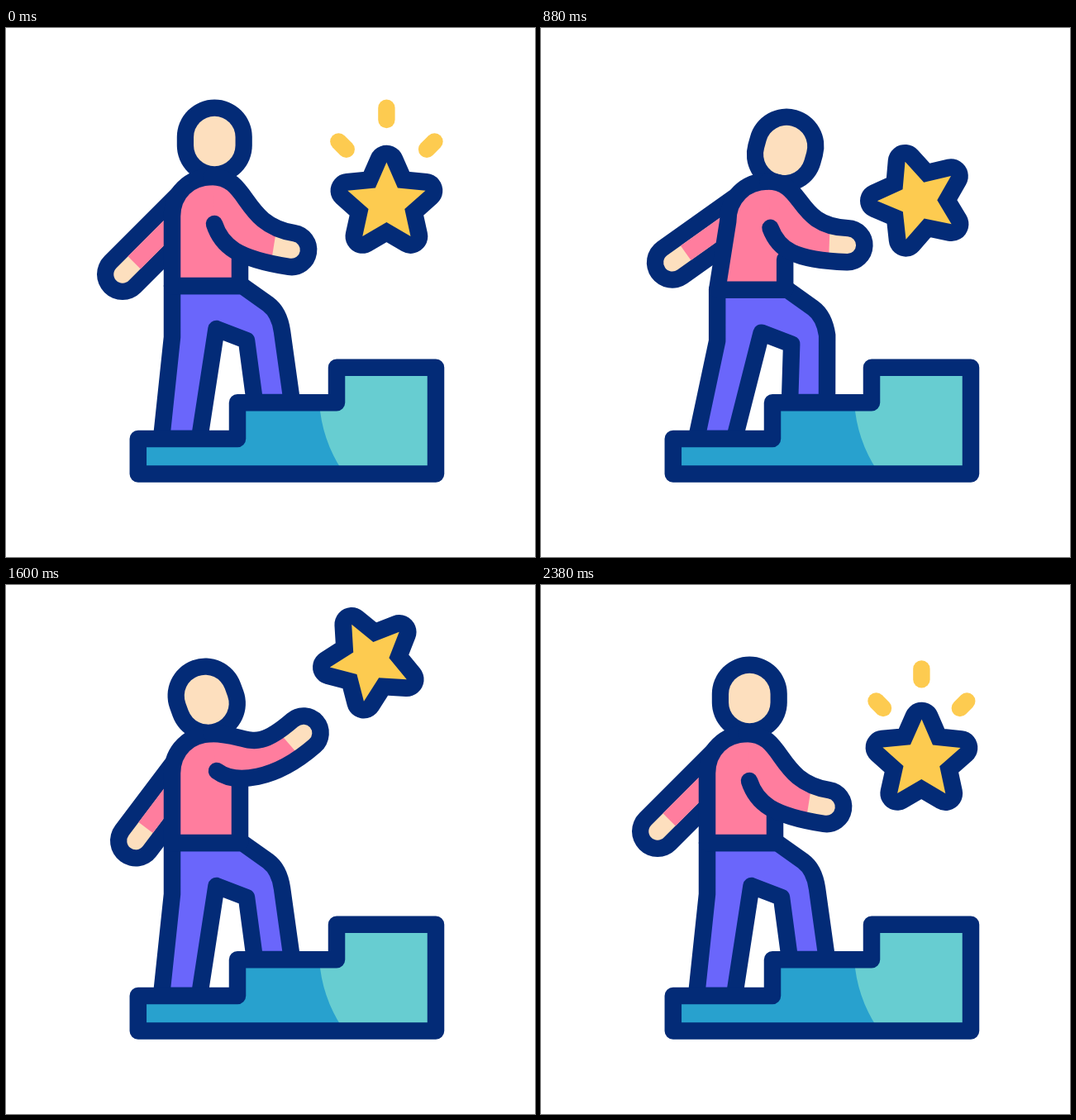
Animation of 640 by 640 pixels, one loop 2.4 s. Source, as an HTML page with a canvas:

```html
<!DOCTYPE html>
<html lang="en">
<head>
<meta charset="utf-8">
<title>Climbing to the star</title>
<style>
  html, body { margin: 0; width: 100%; height: 100%; overflow: hidden; background: #fff; }
  canvas { display: block; width: 100vmin; height: 100vmin; }
</style>
</head>
<body>
<canvas id="stage" width="640" height="640"></canvas>
<script>
const ctx = document.getElementById('stage').getContext('2d');
const LOOP = 2400, LINE = 20.5;
const NAVY = '#032b77', PINK = '#ff7d9e', SKIN = '#fddfbe', PURPLE = '#6a66fb',
      BLUE = '#28a1ce', TEAL = '#67cdd1', GOLD = '#fdcb50';
const STAR = { x: 460.4, y: 212 };

const rad = deg => deg * Math.PI / 180;
const span = (t, start, end) => Math.min(1, Math.max(0, (t - start) / (end - start)));
const smooth = s => s * s * (3 - 2 * s);
const smoother = s => s * s * s * (s * (6 * s - 15) + 10);
const point = (x, y) => ({ x, y, toString: () => `${x} ${y}` });
const polar = (p, deg, r) => point(p.x + r * Math.cos(rad(deg)), p.y + r * Math.sin(rad(deg)));

function draw(d, fill, stroke, width = LINE, cap = 'round') {
  const path = new Path2D(d);
  if (fill) {
    ctx.fillStyle = fill;
    ctx.fill(path);
  }
  if (stroke) {
    ctx.strokeStyle = stroke;
    ctx.lineWidth = width;
    ctx.lineCap = cap;
    ctx.stroke(path);
  }
}

const line = (a, b, color, width, cap) => draw(`M${a}L${b}`, null, color, width, cap);

function drawBackArm(hand, shoulder) {
  const deg = Math.atan2(shoulder.y - hand.y, shoulder.x - hand.x) * 180 / Math.PI;
  line(hand, shoulder, NAVY, 62);
  line(hand, shoulder, SKIN, 21.5);
  line(polar(hand, deg, 20), shoulder, PINK, 21.5, 'butt');
}

// The head swings around the neck.
function drawHead(neck, turn) {
  const low = polar(neck, turn - 90, 23), high = polar(neck, turn - 90, 33);
  line(low, high, NAVY, 91);
  line(low, high, SKIN, 50.5);
}

function drawFrontArm(shoulder, elbow, bend, hand, turn) {
  const r = 20.6, back = turn + 180;
  const under = polar(hand, turn + 90, r), over = polar(hand, turn - 90, r);
  const d = `M${elbow}C${polar(elbow, bend, 28)} ${polar(under, back, 64)} ${under}` +
    `A${r} ${r} 0 0 0 ${over}` +
    `C${polar(over, back, 65)} ${polar(shoulder, 0, 46)} ${shoulder}`;
  draw(d, PINK);
  line(polar(hand, back, 22), polar(hand, turn, 20), SKIN, 36, 'butt');
  draw(d, null, NAVY);
}

function drawPerson(t) {
  // Stand, lean forward, reach up, stand again.
  const up = smoother(span(t, 690, 1606));
  const lean = smoother(span(t, 0, 640)) - up;
  const reach = up - smoother(span(t, 1606, 2342));
  const hip = (x, y) => point(x + 13 * lean, y + 5 * lean);
  const chest = (x, y) => point(x + 27 * lean, y + 6 * lean);

  drawBackArm(
    point(141 + 18 * lean + 16 * reach, 298 - 16 * lean + 11.5 * reach),
    point(225 + 22 * lean - 8 * reach, 214 + 8 * lean + 16 * reach));
  drawHead(point(252.3 + 38.3 * lean, 165 + 10.6 * lean), 18 * lean - 20 * reach);

  draw(`M${hip(201, 312)}L${hip(201, 374)}L188 497L234 497L${hip(254.5, 364)}` +
    `L${hip(291, 378)}L301 453L346 453L${hip(334, 367)}` +
    `C${hip(332, 353)} ${hip(328, 342)} ${hip(317, 334)}L${hip(286, 312)}Z`, PURPLE, NAVY);

  const shoulder = chest(249, 180);
  draw(`M${hip(283, 278 - 42 * reach)}L${hip(283, 312)}L${hip(201, 312)}L${chest(201, 228)}` +
    `C${chest(201, 200)} ${chest(222, 180)} ${shoulder}`, PINK, NAVY);

  drawFrontArm(shoulder,
    chest(252 + 3 * reach, 237 - 12 * reach), 72 - 35 * reach,
    point(345.5 + 26 * lean + 14.5 * reach, 268.5 - 89.5 * reach),
    9 - 4 * lean - 50 * reach);
}

function drawStairs() {
  const d = 'M159.8 497H280V453.3H400V410.8H520V539.5H159.8Z';
  draw(d, BLUE);
  draw('M379 453Q382 498 407 536H520V411H400V453Z', TEAL);
  draw(d, null, NAVY);
}

function drawRays(t) {
  const now = t > LOOP / 2 ? t - LOOP : t;
  const head = smooth(span(now, -150, 200));
  const tail = smooth(span(now, -86, 264));
  if (head === 0 || tail === 1) return;
  const hub = point(STAR.x, STAR.y - 16.6);
  for (const side of [-1, 0, 1]) {
    const tilt = Math.abs(side), deg = 45 * side - 90;
    const at = k => polar(hub, deg, 75.4 - 15 * tilt + (58.5 - 4 * tilt) * k);
    line(at(tail), at(head), GOLD, 20.4);
  }
}

// The star hops up and back while it spins twice.
function drawStar(t) {
  const hop = smooth(span(t, 814, 1486)) - smooth(span(t, 1540, 2385));
  const sway = Math.sin(Math.PI * span(t, 700, 1600));
  const turn = -720 * smooth(span(t, 720, 2398));
  const centre = point(STAR.x - 20 * hop - 6 * sway, STAR.y - 122 * hop);
  const tips = Array.from({ length: 10 }, (_, i) =>
    polar(centre, turn - 90 + 36 * i, i % 2 ? 23 : 49.5));
  const d = `M${tips.join('L')}Z`;
  draw(d, null, NAVY, 41.6);
  draw(d, GOLD);
}

function render(t) {
  ctx.fillStyle = '#fff';
  ctx.fillRect(0, 0, 640, 640);
  ctx.lineJoin = 'round';
  drawPerson(t);
  drawStairs();
  drawRays(t);
  drawStar(t);
}

const began = performance.now();
function tick() {
  render((performance.now() - began) % LOOP);
  requestAnimationFrame(tick);
}
tick();
</script>
</body>
</html>
```
